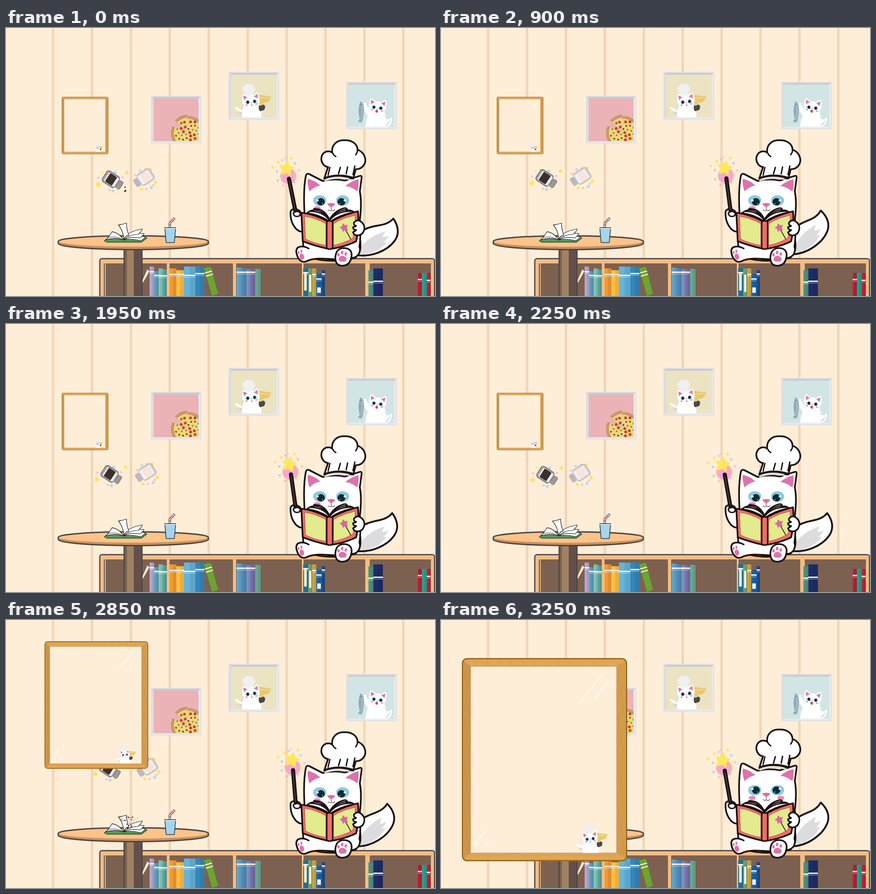
Animation, 947 px wide and 592 px high, one loop 3500 ms. Source, as an HTML page:

```html
<!DOCTYPE html>
<html lang="en">
<head>
<meta charset="utf-8">
<title>Cat chef</title>
<style>
html, body { margin: 0; width: 100%; height: 100%; overflow: hidden; background: #feeed8; }
svg { display: block; width: 947px; height: 592px; }
svg svg { width: auto; height: auto; }
</style>
</head>
<body>
<svg id="stage" viewBox="0 0 947 592" stroke-linecap="round" stroke-linejoin="round"></svg>
<script>
const INK = '#1b1010', PINK = '#df72aa', WALL = '#feeed8';
const YEL = '#fbe35b', BLUE = '#a9dcec', ROSE = '#f2a0cf';

const rect = (x, y, w, h, fill, more = '') =>
  `<rect x="${x}" y="${y}" width="${w}" height="${h}" fill="${fill}" ${more}/>`;
const oval = (x, y, rx, ry, fill, more = '') =>
  `<ellipse cx="${x}" cy="${y}" rx="${rx}" ry="${ry}" fill="${fill}" ${more}/>`;
const path = (d, fill = 'none', stroke = 'none', w = 1, more = '') =>
  `<path d="${d}" fill="${fill}" stroke="${stroke}" stroke-width="${w}" ${more}/>`;
const group = (id, body) => `<g id="${id}">${body}</g>`;
const place = (t, body) => `<g transform="${t}">${body}</g>`;

function star(x, y, r, fill, turn = 0) {
  let pts = '';
  for (let i = 0; i < 10; i++) {
    const a = turn - Math.PI / 2 + i * Math.PI / 5, q = i % 2 ? r * .52 : r;
    pts += `${(x + q * Math.cos(a)).toFixed(1)},${(y + q * Math.sin(a)).toFixed(1)} `;
  }
  return `<polygon points="${pts}" fill="${fill}" stroke="${fill}" stroke-width="${r * .16}"/>`;
}
const plus = (x, y, r = 2.5) => path(`M${x - r} ${y}h${2 * r}M${x} ${y - r}v${2 * r}`, 'none', ROSE, 1.2);

function stripes() {
  let s = '';
  for (let i = 0; i < 10; i++) s += rect(101.2 + i * 85.9, 0, 5.6, 592, '#f2d6b9');
  return s;
}

function picture(x, y, w, h, fill, body) {
  return place(`translate(${x} ${y})`,
    rect(0, 0, w, h, '#e9eaed') +
    path(`M0 0H${w}L${w - 6} 6H6Z`, '#c9cacf') +
    path(`M0 0L6 6V${h - 6}L0 ${h}Z`, '#dcdde2') +
    rect(1, 1, w - 2, h - 2, 'none', 'stroke="#dfe0e5" stroke-width="2"') +
    `<clipPath id="p${x}">${rect(6, 6, w - 12, h - 11, '#000')}</clipPath>` +
    `<g clip-path="url(#p${x})">${rect(0, 0, w, h, fill)}${place(`translate(${-x} ${-y})`, body)}</g>`);
}

function pizza() {
  let s = oval(402, 232, 38, 38, '#c8996b') + oval(402, 232, 31.5, 31.5, '#f0d577') +
    path('M401 230L361 214L376 190L401 188Z', '#ebb3b6') +
    path('M400 229L373 204Q385 192 400 191Z', '#c8996b') +
    path('M400 229L378 208Q388 199 400 198Z', '#f0d577');
  const tops = ['#c5413f', '#65883a', '#3c2a25', '#c5413f'];
  for (let i = 0; i < 36; i++) {
    const a = i * 2.4, r = 5 * Math.sqrt(i + .5), c = i % 4;
    const x = 402 + r * Math.cos(a), y = 231 + r * Math.sin(a);
    if (x < 400 && y < 215) continue;
    const q = c % 3 ? 1.8 : 3.1;
    s += oval(x.toFixed(1), y.toFixed(1), q, q, tops[c]);
  }
  return s + oval(394, 208, 3, 3, tops[0]) + oval(387, 210, 2.5, 2.5, tops[0]) + oval(396, 217, 1.7, 1.7, tops[1]);
}

// Small cat face around 0,0
const face = path('M-17 -17Q-16 -18 -5 -11Q0 -13 6 -11Q15 -18 17 -17Q20 -7 19 2Q17 13 0 14Q-17 13 -19 2Q-20 -7 -17 -17Z', '#fff') +
  path('M-16 -14L-7 -9Q-13 -6 -15 -3ZM16 -14L7 -9Q13 -6 15 -3Z', PINK) +
  oval(-8, 2, 4.6, 4.2, '#8fd0e0') + oval(8, 2, 4.6, 4.2, '#8fd0e0') +
  oval(-7.5, 2, 3, 3.3, '#12303d') + oval(7.5, 2, 3, 3.3, '#12303d') +
  oval(-11, 8, 2.6, 1.6, '#e98bb5') + oval(11, 8, 2.6, 1.6, '#e98bb5') + oval(0, 4.5, 1.5, 1, PINK);

const chef = path('M-17 36Q-20 22 -28 24Q-37 18 -35 14Q-25 17 -19 24L-14 37Z', '#fff') +
  path('M-30 25Q-24 32 -14 36L-14 30L-22 25Z', '#d7d7dc') +
  path('M-14 -12L-16 -20Q-23 -27 -15 -32Q-13 -38 -5 -36Q3 -38 6 -31Q13 -26 6 -19L6 -10H-14Z', '#eff0ef') +
  path('M14 -13Q30 -10 44 -9Q43 0 36 4Q28 3 20 13Z', '#e8c970') +
  path('M20 -6Q30 -7 41 -5', 'none', '#f1dc96', 2) +
  path('M-13 8Q-23 24 -19 38H22Q26 24 15 8Z', '#fff') + place('translate(0 1) rotate(-7)', face) +
  path('M0 10q1.500 -2 3 0q-1.500 4 -3 0', '#c53c62') +
  path('M17 14Q17 9 22 12Q25 8 29 10Q33 13 29 21L20 24Q16 20 17 14Z', '#4c4749');

const fisher = path('M14 47Q33 46 32 24L25 29L12 27Z', '#fff') +
  path('M14 45Q25 44 29 30L22 37Z', '#d9dcdf') +
  path('M-38 -11Q-29 -8 -30 10Q-31 26 -35 36L-43 34L-39 27Q-45 9 -38 -11Z', '#91abb8') +
  path('M-36 -6Q-31 10 -37 28', 'none', '#b4c7cf', 2) + oval(-36, -4, .9, .9, '#354b57') +
  path('M-15 8Q-28 30 -27 47H18Q21 26 14 8Z', '#fff') +
  path('M-20 22Q-30 14 -31 -4Q-29 -10 -25 -7Q-23 4 -14 10Z', '#fff') + place('translate(0 1) rotate(8)', face) +
  path('M-5 10q4 -4 6 -1q0 6 -4 5z', '#d93856');

function books() {
  // x, top, width, colour, label offset (0 for none)
  const list = [
    [317, 527, 10, '#b7a5d0', 10], [327, 537, 10, '#5a9fb7', 8], [337, 531, 9, '#86c3b8', 15], [346, 533, 9, '#55a49d', 13],
    [361, 531, 15, '#f29a31', 12], [376, 535, 17, '#fdbe42', 8], [393, 527, 25, '#65b4dc', 18], [418, 527, 20, '#3587bb', 14],
    [509, 529, 11, '#5fa5cd', 9], [520, 531, 11, '#5089b5', 7], [531, 533, 9, '#7f90c0', 5], [540, 532, 10, '#766aa8', 6], [550, 532, 12, '#68a991', 0],
    [656, 531, 11, '#1e7599', 8], [667, 531, 9, '#72a06d', 0], [676, 531, 9, '#cba545', 12], [685, 543, 12, '#1b62a7', 10], [697, 535, 7, '#1d4a85', 7],
    [800, 535, 11, '#4f917b', 25], [811, 531, 21, '#1e2c68', 27], [909, 541, 9, '#bb1d35', 13], [918, 541, 11, '#25a18c', 0], [929, 541, 8, '#c31d35', 15]];
  return list.map(([x, y, w, c, k]) => rect(x, y, w, 70, c) + rect(x + w / 2, y, w / 2, 70, '#00000014') +
    (k ? rect(x, y + k, w, 3, '#f8f3e6') + rect(x, y + k + 5, w, 1, '#fff9') : '')).join('') +
    rect(658, 542, 6, 38, '#eee7cf') + rect(669, 545, 5, 38, '#f2efe2') + rect(687, 573, 8, 12, '#eef2f5') +
    path('M437 531L452 527L468 587L455 592Z', '#6ba52f') + path('M440 541L454 537M442 548L456 544', 'none', '#f2ecd0', 2.5) +
    path('M312 533L317 537L303 562L298 564Z', '#f6e9d2', '#7a6556', .6);
}

function shelf() {
  const bays = [[220, 135], [361, 140], [508, 145], [657, 136], [803, 135]];
  return rect(207, 509.5, 739, 120, '#f3bd84', 'rx="5" stroke="#5a5353" stroke-width="3"') +
    bays.map(([x, w]) => rect(x, 520, w, 80, '#7c6151')).join('') +
    rect(216, 520, 2, 80, '#5a5353') + books();
}

const table = rect(261, 480, 39, 130, '#a08263', 'stroke="#4d4344" stroke-width="3"') +
  rect(262, 488, 5, 110, '#7b6151') + rect(282, 488, 17, 110, '#64504a') +
  path('M115.5 471V476A165.5 13.5 0 0 0 446.5 476V471Z', '#c9925e', '#4d4344', 3) +
  oval(281, 471, 165.5, 12, '#fcc48a') +
  path('M115.5 471A165.5 12 0 0 1 446.5 471', 'none', '#4d4344', 3);

const straw = 'M361.5 442V431L371 421.5';
const cup = path(straw, 'none', '#473a40', 5) + path(straw, 'none', '#f7d8de', 3) +
  path(straw, 'none', '#d3546e', 3, 'stroke-dasharray="2 4" stroke-linecap="butt"') +
  path('M350.5 441H374.5L371.5 474H353.5Z', '#a4d5ec', '#333743', 1.6) + path('M351 443H374', 'none', '#d6eef8', 2);

const openBook = path('M217 470L231 460L262 468L302 459L311 464L299 473H260L222 473Z', '#4ca35b', '#25372b', 1.3) +
  path('M221 468Q229 459 234 450Q250 452 259 468Q240 462 221 468Z', '#fff', '#25282b', 1.3) +
  path('M226 463Q242 458 259 468', 'none', '#25282b', 1) +
  path('M259 468Q278 457 308 461Q304 466 298 470Q276 465 259 468Z', '#fff', '#25282b', 1.2) +
  path('M259 467Q272 451 305 454Q301 459 296 464Q275 460 259 468Z', '#fff', '#25282b', 1.2) +
  path('M259 467Q268 449 301 444Q298 451 291 456Q272 456 259 468Z', '#fff', '#25282b', 1.2) +
  group('leaf', path('M248 435Q257 434 266 431Q266 445 271 457Q263 459 260 467Q259 447 248 435Z', '#fff', '#25282b', 1.3));

function shaker(id, x, y, flip, c, sparks) {
  return group(id, sparks + place(`translate(${x} ${y}) scale(${flip} 1) rotate(33)`,
    rect(-20, -14, 33, 28, c[0], `rx="6" stroke="${c[1]}" stroke-width="1.8"`) +
    rect(-15, -11, 27, 22, c[2], 'rx="2"') + rect(-12, -11, 18, 22, c[3], 'rx="2"') +
    path('M11 -11L16 -8V8L11 11Z', c[0]) +
    rect(14, -9, 10, 18, c[4], `rx="3" stroke="${c[1]}" stroke-width="1.3"`) +
    path('M17 -6V6M21 -5V5', 'none', c[1], 1.4, 'stroke-dasharray="1 3"')));
}
const pepper = shaker('pepper', 234.5, 336, 1, ['#aaa7a9', '#716d71', '#f1eded', '#3b302b', '#a5a3a6'],
  star(203.5, 346, 6, YEL, .2) + star(267, 319, 4.5, YEL) + star(223, 316, 3, YEL) + star(241, 319, 4, BLUE) +
  star(236, 360, 4, BLUE) + star(212, 319, 2.5, YEL) + plus(204, 331) + plus(257, 330) + plus(228, 358) + star(246, 357, 3, YEL));
const salt = shaker('salt', 305.5, 331, -1, ['#d8d5d7', '#b8b4b8', '#f7f2f1', '#f7e4dd', '#bdbabf'],
  star(330, 341, 4.5, YEL, .2) + star(319, 312, 4, YEL) + star(299, 356, 4, YEL) + star(321, 353, 4, BLUE) +
  star(296, 315, 3.5, BLUE) + star(326, 330, 2.5, YEL) + plus(285, 325) + plus(310, 356) + plus(307, 312) + plus(325, 347));

const tail = path('M770 467C790 433 820 440 839 432Q849 428 855 421C866 437 869 455 858 470C842 492 805 508 770 501Z', '#fff', INK, 4) +
  path('M777 499Q784 478 800 467Q817 455 838 449Q832 457 832 462Q839 462 846 459Q841 468 833 472Q838 474 842 473C824 493 800 502 777 500Z', '#dcdcde');

const wand = oval(623, 328, 18.5, 18.5, '#fbdc9a') + oval(623, 327, 17, 17, '#f8a6d3') +
  path('M624.5 333L640 410', 'none', INK, 9) + path('M625 337L638 401', 'none', '#4c3534', 2.5) +
  star(619.5, 311, 16, '#ffe75c', .1) +
  star(601, 297, 3.5, YEL) + star(630, 288, 3.5, YEL) + star(588, 308, 3.5, YEL) + star(641, 324, 2, YEL) +
  star(638, 299, 3.5, BLUE) + star(598, 317, 3.5, BLUE) + star(600, 337, 3.5, BLUE) + star(615, 287, 2, BLUE) +
  plus(610, 292) + plus(647, 314) + plus(612, 348) + plus(636, 341);

const hat = path('M703 331L711 307C694 305 690 279 707 273Q714 271 720 275C718 257 732 247 747 248C764 247 776 257 776 269C790 273 797 290 791 301Q785 312 772 312L767 331Q735 320 703 331Z', '#fff', INK, 3.7) +
  path('M721 276Q723 281 728 284M776 269Q776 275 772 280M715 308L711 325M738 308L734 322M754 307L751 322M770 305L766 324', 'none', INK, 3) +
  path('M702 333Q732 321 767 333', 'none', INK, 3) + path('M704 337Q732 327 764 336', 'none', '#ded9da', 3);

const eye = (x, side) => oval(x, 381, 14.5, 11.5, '#8bcbdc') +
  `<g class="pupil">` + oval(x + 2.5 * side, 384, 8.7, 8.3, '#0d2936') + oval(x - 5 * side, 381, 2.6, 2.4, '#fff') +
  oval(x + 6 * side, 388, 1.3, 1.3, '#77b9c8') + '</g>';

const head = path('M660 425C657 385 657 350 662 326Q664 320 670 323L699 338Q722 332 748 337L780 327Q786 325 785 331L781 361Q786 385 781 425Z', '#fff', INK, 3.7) +
  path('M666 333Q683 337 694 348Q680 350 670 361Q665 346 666 333ZM778 334Q760 339 749 349Q764 351 776 361Q779 345 778 334Z', PINK) +
  eye(692.5, 1) + eye(743, -1) + oval(687, 398, 7.5, 4.8, '#ea8ab9') +
  group('blush', oval(750, 398, 7.5, 4.8, '#ea8ab9')) +
  path('M709 388Q718 385 727 388Q723 395 718 395.5Q713 395 709 388Z', '#d8759f') +
  path('M718 395V401M711 401Q714 406 718 402Q722 406 726 401', 'none', '#6a5358', 1.4);

const body = path('M657 450C640 452 627 430 628 406Q630 399 640 400Q650 402 651 411L655 425Z', '#fff', INK, 3.7) +
  path('M660 420Q650 455 660 505Q720 522 772 507Q786 485 781 420Z', '#fff', INK, 3.7);

const feet = path('M735 507C715 518 690 506 668 513Q654 522 645 508Q636 489 646 484Q660 481 670 490L690 482H778Q784 500 768 506Z', '#fff') +
  path('M730 511C710 511 690 506 668 513Q654 522 645 508Q636 489 646 484Q656 480 668 487M762 508Q786 508 782 470', 'none', INK, 3.7) +
  oval(653, 505, 5, 7, PINK, 'transform="rotate(-15 653 505)"') +
  oval(646, 496, 2, 3.5, PINK) + oval(652, 493, 2, 3.5, PINK) +
  path('M727 509C727 493 735 486 747 486Q762 487 763 500Q762 525 742 525Q728 525 727 509Z', '#fff', INK, 3.7) +
  path('M734 511Q735 504 742 503Q751 504 752 511Q751 517 743 516Q735 517 734 511Z', PINK) +
  oval(734, 501, 2.8, 3.8, PINK) + oval(742, 496, 2.8, 4, PINK) + oval(750, 499, 2.8, 3.8, PINK);

const novel = path('M652 408Q680 411 712 428V488Q680 481 655 471Z', '#ef6e69', INK, 3.7) +
  path('M717 428Q745 412 777 405Q780 440 773 471Q750 483 717 488Z', '#ef6e69', INK, 3.7) +
  path('M659 416Q685 420 706 432V480Q680 476 661 466Z', '#e4ea8e', '#b4514f', 1.2) +
  path('M723 432Q746 418 771 414Q771 440 766 464Q745 476 723 480Z', '#e4ea8e', '#b4514f', 1.2) +
  path('M664 409Q674 401 682 402Q675 398 688 400Q704 402 714 423Q726 403 746 398Q756 397 751 403Q763 401 768 407Q738 412 715 428Q690 411 664 409Z', '#fff', INK, 3) +
  path('M672 405Q700 405 714 425Q732 403 766 405M682 402Q702 404 714 424Q726 404 753 401', 'none', INK, 3) +
  path('M708 428Q714 424 721 428V486Q714 491 708 486Z', '#ef6e69', INK, 3) +
  path('M749 445L761 466', 'none', '#4b3134', 2) + star(746.5, 441, 9, '#d9669b', -.3);

const paw = path('M768 430Q776 421 784 428Q792 434 791 444Q789 456 778 458Q768 459 766 451Q771 449 773 446Q766 446 766 440Q770 439 773 437Q767 436 768 430Z', '#fff', INK, 3.5);
const grip = path('M634 409Q642 402 649 408Q651 414 645 416Q636 418 634 409Z', '#fff', INK, 3);

// Wooden frame, 365 by 449 at full size
function board() {
  let grain = '';
  for (let i = 0; i < 12; i++) {
    const y = 25 + i * 34;
    grain += `M${5 + i % 3 * 4} ${y}q5 14 1 30M${348 + i % 3 * 5} ${y}q-4 16 1 32M${28 + i * 26} 5q6 5 3 12M${20 + i * 27} 435q12 4 22 1`;
  }
  return rect(1.5, 1.5, 362, 446, '#e0a657', 'rx="10" stroke="#9d6b1c" stroke-width="3"') +
    path('M4 6L19 18V431L4 443Z', '#cd944b') + path('M361 6L342 18V431L361 443Z', '#d39b4f') +
    path(grain, 'none', '#c48a40', 1, 'opacity=".6"') +
    rect(19, 18, 323, 413, WALL, 'stroke="#c5934f" stroke-width="1.5"') +
    path('M259 101L309 38M293 90L326 48M28 412L53 380M50 417L59 407', 'none', '#fffaf0', 3, 'opacity=".85"') +
    place('translate(283 397) scale(.88)', chef);
}

const stage = document.getElementById('stage');
stage.innerHTML = rect(0, 0, 947, 592, WALL) + stripes() +
  picture(320, 150, 111, 105, '#ebb3b6', pizza()) +
  picture(491, 97.5, 112, 105, '#ebe3c1', place('translate(541 160)', chef)) +
  picture(751, 119.5, 112, 104, '#d1e5e4', place('translate(820 173)', fisher)) +
  shelf() + table + cup + openBook + pepper + salt + group('dust', '') +
  group('tail', tail) + body + group('head', head) + group('hat', hat) +
  feet + novel + group('wand', wand) + grip + paw + group('board', board());

const part = id => document.getElementById(id);
const move = (id, t) => part(id).setAttribute('transform', t);
const rnd = n => { const s = Math.sin(n * 91.7 + 4.1) * 4375.5; return s - Math.floor(s); };

const SHAKE = [0, .2, .4, .6, .8, 1, .5];
const LEAF = [0, .5, 1, 1, .5, 0, 0];
const WAVE = [0, .2, .4, .6, .9, 1, .6, .2, .2, .5, .8, 1, .8, .5];
// left, top and width while the board comes forward
const GROW = [[120, 127, 120], [121, 123, 126.5], [116, 82, 166], [85, 47, 229], [69, 42, 290], [48, 66, 345], [46, 84, 365]];

function dust(age) {
  if (age > 580) return '';
  let s = '';
  const count = age < 40 ? 8 : 40, open = Math.min(1, age / 180);
  const tall = 52 - Math.max(0, age - 260) * .09;
  for (let i = 0; i < count; i++) {
    const dark = i % 5 < 3, a = rnd(i), b = rnd(i + 50);
    const x = (dark ? 262 : 278) + (a - .5) * (6 + 22 * open) + (dark ? 5 : 1) * open;
    const y = 356 + age * .165 + (b - .5) * (10 + (tall - 10) * open);
    const r = dark ? .6 + rnd(i + 90) * 1.1 : .5 + rnd(i + 90) * .4;
    s += oval(x.toFixed(1), y.toFixed(1), r, r, dark ? '#2d1e1b' : '#b07f6c');
  }
  return s;
}

let last = -1;
function draw(now) {
  const t = now % 3500;
  const k = t < 3150 ? Math.floor(t / 150) : t < 3250 ? 21 : 22;
  if (k !== last) {
    last = k;
    const at = k < 22 ? k * 150 : 3250, u = SHAKE[k % 7], c = k % 14;
    move('pepper', `translate(${-6 * u} ${-6 * u})`);
    move('salt', `translate(${7.5 * u} ${-5 * u})`);
    move('leaf', `translate(${-2 * LEAF[k % 7]} 0) rotate(${-4 * LEAF[k % 7]} 262 463)`);
    move('tail', `rotate(${-2.15 * Math.min(c, 14 - c)} 768 486)`);
    move('wand', `rotate(${6.7 * WAVE[c]} 640 410)`);
    part('dust').innerHTML = dust(at % 1150);
    const lift = k < 20 ? 0 : k < 21 ? .5 : 1;
    move('head', `translate(0 ${-5 * lift})`);
    move('hat', `translate(0 ${-6 * lift})`);
    part('blush').setAttribute('opacity', lift);
    for (const p of stage.querySelectorAll('.pupil')) p.setAttribute('transform', `translate(0 ${-3 * lift})`);
    const [x, y, w] = GROW[k - 16] || [123, 152, 103];
    move('board', `translate(${x} ${y}) scale(${w / 365})`);
  }
  requestAnimationFrame(draw);
}
requestAnimationFrame(draw);
</script>
</body>
</html>
```
